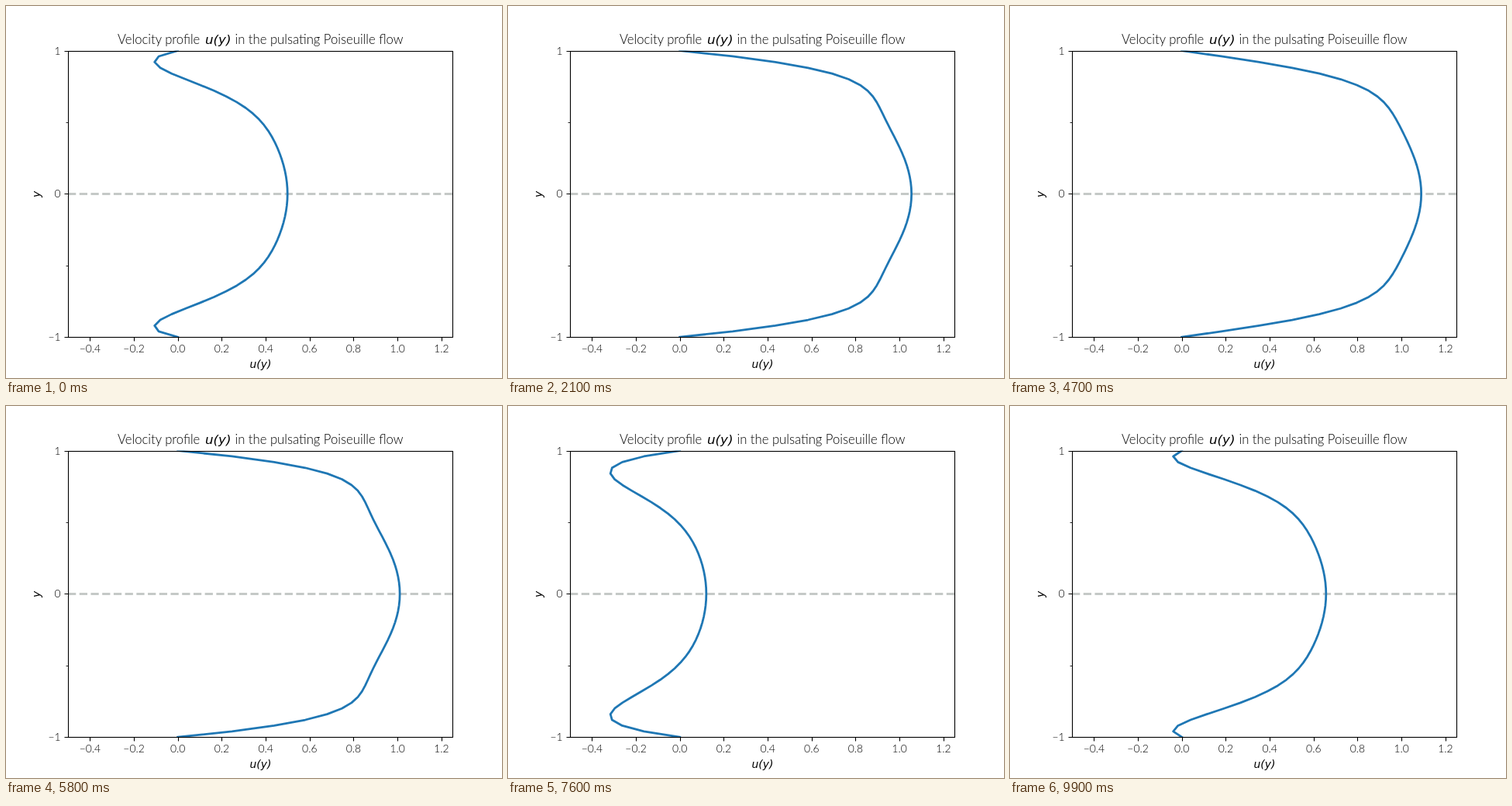
Animation of 640 by 480 pixels, one loop 10000 ms. Source, as an HTML page:

```html
<!DOCTYPE html>
<html lang="en">
<head>
<meta charset="utf-8">
<title>Pulsating flow</title>
<style>
  html, body { margin: 0; width: 100%; height: 100%; overflow: hidden; background: #fff; }
  svg { display: block; }
  text { font: 300 13.89px Lato, sans-serif; }
  .title { font-size: 16.67px; }
  .math { font-family: "DejaVu Sans", sans-serif; font-style: oblique; font-weight: 400; }
  .mid { text-anchor: middle; }
  .end { text-anchor: end; }
  path, rect { fill: none; stroke: #000; stroke-width: 1.11; }
  #axis { stroke: #c5c9c7; stroke-width: 2.78; stroke-dasharray: 10.28 4.44; }
  #curve { stroke: #1f77b4; stroke-width: 2.78; stroke-linejoin: round; stroke-linecap: square; }
  #minor { stroke-width: .83; }
</style>
</head>
<body>
<svg width="640" height="480" viewBox="0 0 640 480">
  <clipPath id="plot"><rect x="80" y="57.6" width="496" height="369.6"/></clipPath>
  <g clip-path="url(#plot)">
    <path id="axis" d="M80 242.5H576"/>
    <path id="curve"/>
  </g>
  <path id="major"/>
  <path id="minor" d="M80.5 150.5h-3M80.5 335.5h-3"/>
  <rect x="80.5" y="58.5" width="496" height="369"/>
  <g id="labels"></g>
  <text class="title" x="144" y="49">Velocity profile</text>
  <text class="title math" x="257" y="49">u(y)</text>
  <text class="title end" x="512.5" y="49">in the pulsating Poiseuille flow</text>
  <text class="math mid" x="328.5" y="467">u(y)</text>
  <text class="math mid" transform="translate(43.5 243) rotate(-90)">y</text>
</svg>
<script>
const $ = id => document.getElementById(id);
const px = u => 80 + (u + 0.5) * 496 / 1.75;
const py = y => 242.4 - y * 184.8;
const snap = v => Math.round(v) + 0.5;

// Ticks and their labels
let ticks = '', labels = '';
const addLabel = (cls, x, y, s) => {
  labels += `<text class="${cls}" x="${x}" y="${y}">${s.replace('-', '\u2212')}</text>`;
};
for (let i = -2; i <= 6; i++) {
  const x = px(i / 5);
  ticks += `M${snap(x)} 427.5v5`;
  addLabel('mid', x, 447, (i / 5).toFixed(1));
}
for (const y of [-1, 0, 1]) {
  ticks += `M80.5 ${snap(py(y))}h-5`;
  addLabel('end', 70.5, py(y) + 5, String(y));
}
$('major').setAttribute('d', ticks);
$('labels').innerHTML = labels;

// Steady parabola plus an oscillating Stokes layer, Womersley number 10
const S = 10 / Math.SQRT2;
const ccosh = y => [Math.cosh(S * y) * Math.cos(S * y), Math.sinh(S * y) * Math.sin(S * y)];
const [wr, wi] = ccosh(1);
const norm = wr * wr + wi * wi;

function velocity(y, t) {
  const [r, i] = ccosh(y);
  const re = 1 - (r * wr + i * wi) / norm;
  const im = -(i * wr - r * wi) / norm;
  return 0.5 * (1 - y * y) - 0.6 * (re * Math.sin(t) + im * Math.cos(t));
}

function draw(now) {
  const step = Math.floor(now / 100) % 100;
  const t = step * 50 / 99;
  const points = [];
  for (let i = -25; i <= 25; i++) {
    const y = i / 25;
    points.push(px(velocity(y, t)).toFixed(2) + ' ' + py(y).toFixed(2));
  }
  $('curve').setAttribute('d', 'M' + points.join('L'));
}

const start = performance.now();
function loop() {
  draw(performance.now() - start);
  requestAnimationFrame(loop);
}
loop();
</script>
</body>
</html>
```
